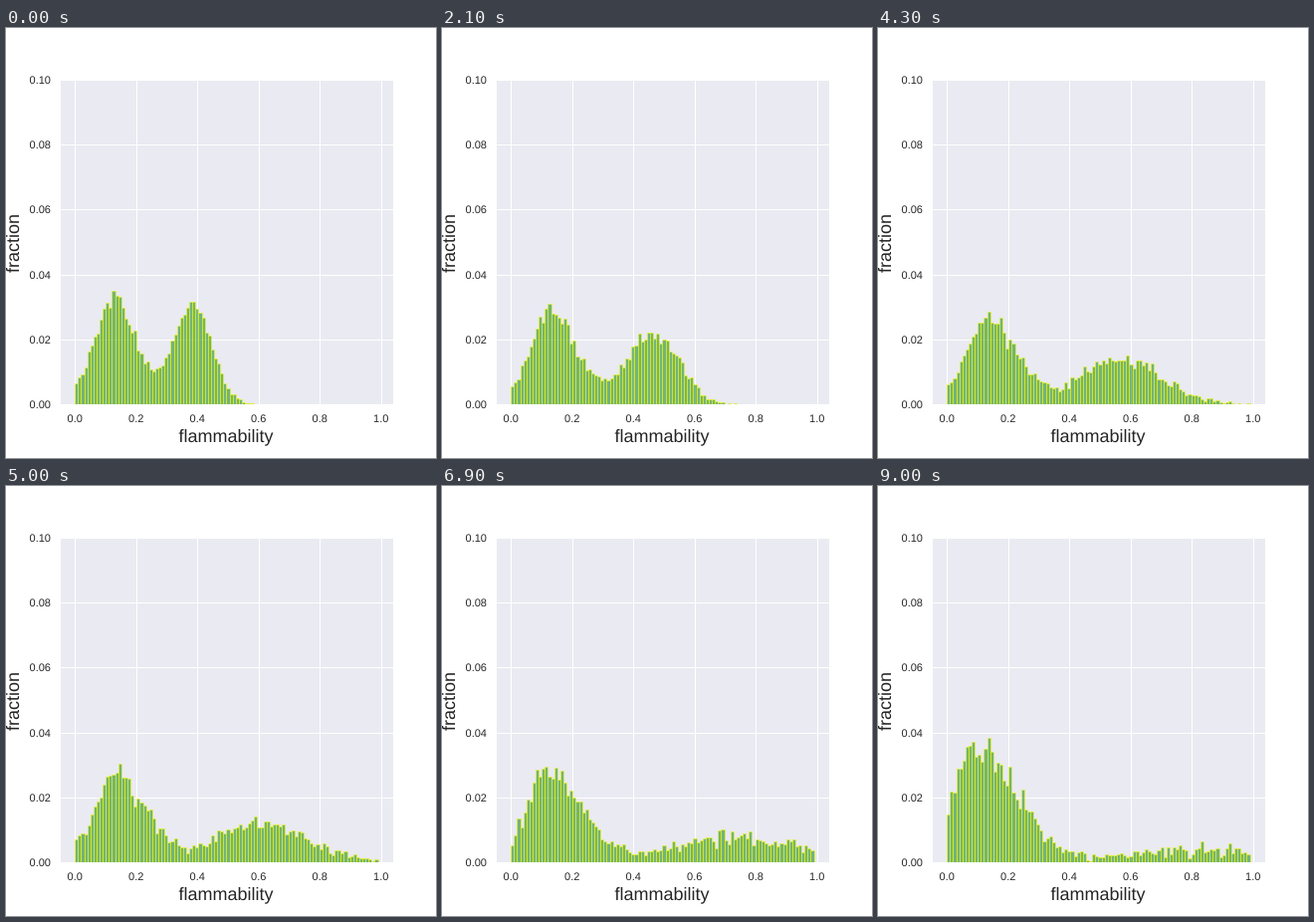
Animation of 432x432 px, one loop 9100 ms. Source, as an HTML page:

```html
<!DOCTYPE html>
<html lang="en">
<head>
<meta charset="utf-8">
<title>Flammability histogram</title>
<style>
  html, body { margin: 0; width: 100%; height: 100%; overflow: hidden; background: #fff; }
  svg { display: block; width: 432px; height: 432px; }
  text { font-family: "Liberation Sans", Arial, sans-serif; font-size: 11px; fill: #262626;
    text-rendering: geometricPrecision; }
  .label { font-size: 18px; text-anchor: middle; }
  .grid { stroke: #fff; stroke-width: 1; }
  #bars rect { fill: #008000; fill-opacity: .5; stroke: #ff0; stroke-opacity: .5; }
</style>
</head>
<body>
<svg id="chart" viewBox="0 0 432 432">
  <defs><clipPath id="plot"><rect x="54" y="52" width="335" height="326"/></clipPath></defs>
  <rect x="55" y="52" width="334" height="326" fill="#eaeaf2"/>
  <g id="axes"></g>
  <g id="bars" clip-path="url(#plot)"></g>
  <text class="label" x="221" y="416">flammability</text>
  <text class="label" transform="translate(13 216.5) rotate(-90)">fraction</text>
</svg>
<script>
const NS = "http://www.w3.org/2000/svg";
const LOOP = 9100, STEP = 100;
const BARS = 98, BIN = 1 / 99;
const LEFT = 69.22, UNIT = 307.47, BASE = 378, RISE = 3261.6;

const mix = (a, b, u) => a + (b - a) * u;

function add(parent, tag, attrs, text = "") {
  const node = document.createElementNS(NS, tag);
  for (const key in attrs) node.setAttribute(key, attrs[key]);
  node.textContent = text;
  return parent.appendChild(node);
}

// Bell curve with a different width on each side of its centre.
function bell(x, { centre, height, left, right }) {
  const d = (x - centre) / (x < centre ? left : right);
  return height * Math.exp(-d * d / 2);
}

// Calm population: dips, then grows back while drifting towards zero.
const calm = s => ({
  centre: .125 - .035 * s ** 4,
  height: .0325 - .018 * s + .0205 * s ** 3,
  left: .069,
  right: .069 + .06 * s
});

// Flammable population: moves right, spreads out and thins.
const flammable = s => ({
  centre: .38 + .3 * s + .12 * s ** 2,
  height: .031 * Math.exp(-1.35 * s - .72 * s ** 2),
  left: .064 + .09 * s + .07 * s ** 2,
  right: .061 + .08 * s + .36 * s ** 3
});

function hash(a, b) {
  let n = Math.imul(a + 17, 374761393) ^ Math.imul(b + 5, 668265263);
  n = Math.imul(n ^ (n >>> 13), 1274126177);
  return ((n ^ (n >>> 16)) >>> 0) / 4294967296;
}

// Roughly normal jitter that drifts slowly, out of phase from bin to bin.
function jitter(bin, time) {
  const phase = time / 1300 + hash(bin, 99);
  const k = Math.floor(phase);
  const draw = n => (hash(bin, n) + hash(bin, n + 40) - 1) * 2.4;
  return mix(draw(k), draw(k + 1), phase - k);
}

const axes = document.getElementById("axes");
for (let i = 0; i <= 5; i++) {
  const tickX = LEFT + UNIT * i / 5;
  const x = Math.round(tickX), y = Math.round(BASE - RISE * i / 50);
  add(axes, "path", { class: "grid", d: `M${x + .5} 52V378` });
  add(axes, "path", { class: "grid", d: `M55 ${y + .5}H389` });
  add(axes, "text", { x: tickX, y: 396, "text-anchor": "middle" }, (i / 5).toFixed(1));
  add(axes, "text", { x: 45, y: y + 4, "text-anchor": "end" }, (i / 50).toFixed(2));
}

const edge = i => Math.round(LEFT + UNIT * BIN * i) + .5;
const barGroup = document.getElementById("bars");
const bars = Array.from({ length: BARS }, (_, i) =>
  add(barGroup, "rect", { x: edge(i), width: edge(i + 1) - edge(i) }));

function render(time) {
  const s = time / (LOOP - STEP);
  const low = calm(s), high = flammable(s);
  const noise = mix(.009, .021, s);
  bars.forEach((bar, i) => {
    const mean = bell(i * BIN, low) + bell(i * BIN, high);
    const value = Math.max(0, mean + noise * Math.sqrt(mean) * jitter(i, time));
    const top = Math.round(BASE - value * RISE);
    bar.setAttribute("y", top + .5);
    bar.setAttribute("height", BASE - top);
  });
}

const start = performance.now();
function tick() {
  const elapsed = (performance.now() - start) % LOOP;
  render(Math.floor(elapsed / STEP) * STEP);
  requestAnimationFrame(tick);
}
tick();
</script>
</body>
</html>
```
